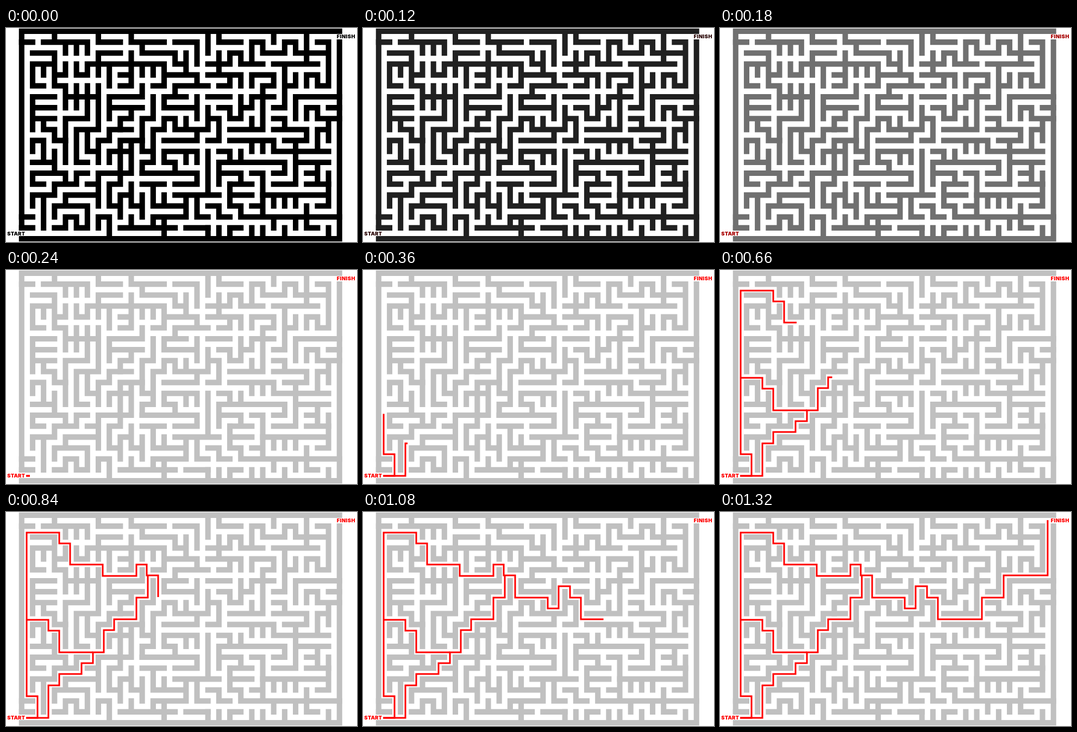
These frames come from a looping animation (646x395 px, 1350 ms). An HTML page:

```html
<!DOCTYPE html>
<html lang="en">
<head>
<meta charset="utf-8">
<title>Maze solver</title>
<style>
  html, body { margin: 0; width: 100%; height: 100%; overflow: hidden; background: #fff; }
  svg { display: block; width: 646px; height: 395px; }
  .walls, .route, text { animation: 1350ms infinite step-end; }
  .walls { fill: none; stroke-width: .5; stroke-linecap: square; animation-name: fade; }
  text { font: 900 9.4px Inter, "Liberation Sans", sans-serif; letter-spacing: .2px; animation-name: redden; }
  .finish { letter-spacing: .5px; }
  .route { fill: none; stroke: #f00; stroke-width: 3; stroke-dasharray: 2000; stroke-dashoffset: 2010; }
  .upper { animation-name: upper; }
  .lower { animation-name: lower; }
  .link { animation-name: link; }

  @keyframes fade {
    0% { stroke: #000; }
    8.889% { stroke: #202020; }
    13.333% { stroke: #707070; }
    17.778%, 100% { stroke: #c0c0c0; }
  }
  @keyframes redden {
    0% { fill: #000; }
    8.889% { fill: #2a0606; }
    13.333% { fill: #a80000; }
    17.778%, 100% { fill: #f00; }
  }
  /* Dash offset is 2000 minus the length drawn; one step per 60 ms. */
  @keyframes upper {
    0% { stroke-dashoffset: 2010; }
    17.778% { stroke-dashoffset: 1993; animation-timing-function: steps(4); }
    35.556% { stroke-dashoffset: 1696; animation-timing-function: steps(6); }
    62.222% { stroke-dashoffset: 1214; animation-timing-function: steps(5); }
    84.444% { stroke-dashoffset: 857; animation-timing-function: steps(3); }
    97.778%, 100% { stroke-dashoffset: 580; }
  }
  @keyframes lower {
    0% { stroke-dashoffset: 2010; }
    17.778% { stroke-dashoffset: 1993; animation-timing-function: steps(4); }
    35.556% { stroke-dashoffset: 1797; animation-timing-function: steps(6); }
    62.222%, 100% { stroke-dashoffset: 1500; }
  }
  @keyframes link {
    0% { stroke-dashoffset: 2010; }
    31.111% { stroke-dashoffset: 1995; }
    35.556% { stroke-dashoffset: 1918; animation-timing-function: steps(2); }
    44.444%, 100% { stroke-dashoffset: 1780; }
  }
</style>
</head>
<body>
<svg viewBox="0 0 646 395">
  <!-- One unit is one maze cell. -->
  <g class="walls" transform="translate(28.8 6) scale(20.17 20.16)">
    <path d="M0 18V0H29M29 1V19H0"/>
    <!-- left, top to bottom -->
    <path d="M0 1H1M2 1H6V2M3 0V1M4 1V2M5 1V2M1 2H3V4H4V3M2 5H1V3H3M2 3V4M3 4V5H4V7M4 8V12
      M5 3V4H6V3H10M7 2V4M7 0V1H9M7 2H9M8 3V5M10 2V5H9M9 4H10M5 5V7M6 5V8H4M4 6H7M7 5V9H5V12H6M6 9V11H7"/>
    <path d="M3 6H1V9M1 7H3M1 8H3M2 8V9H3V10H4M1 11V10H2V12M1 12H3V11M3 12V13M7 12V10H8V9H10
      M2 14H1V13H4V14M6 13H5V14H3V15H1V16M2 15V18M0 17H1M0 18H1M4 16V15H7M6 14H7M7 13V16
      M3 17V16H6V18H5V17H4V18H3M7 18V17H8V19"/>
    <!-- centre left -->
    <path d="M10 0V1H13M14 1H16V3M16 4V5M11 1V2H14V3H15M15 2V4M10 3H13V5H12M11 3V4M12 3V4M13 4H16M14 6V5H17
      M11 5V6H8V8M8 7H11M10 7V8H9V9M12 6V8H11V11H12M12 9V12H11V13M15 6H13V7H16M16 6V8
      M12 9H13V8H14V9H17V7M15 8V9M16 9V10H13M17 10H18V8H17"/>
    <path d="M9 11V10H11M10 10V13M8 12V11H10M9 11V14M7 13H10M11 13H16V14H14M8 16V14H9M11 14H13M12 14V16H15
      M10 14V16H11M9 15H10M9 15V17M8 16H9M11 17V15M10 17V18M9 18H14M12 17V18M13 19V17M12 17H15V15M13 15V16M14 15H18
      M16 12V11H13V12H14V13M15 11V12M17 11V15M16 15V17H17M15 18H17"/>
    <!-- top right -->
    <path d="M17 0V2M18 0V1H20M17 3H19V2H20V3H22M18 2V4M21 1V3M21 1H22V2H24V1H25V2H26M23 0V1M26 0V3
      M23 3H27M26 2H28M27 1H28V5H27V4H26V5M24 3V7H23M24 5H25V4M17 4H20V5M20 6V8H19V7H18M18 5H19V4M17 6H19
      M21 5V4H23V5H22V9H19M20 7H21V6H23M21 8V9"/>
    <!-- right -->
    <path d="M29 6H25V8M26 8V7H27V8H29M28 8V10M28 7H29M23 8H24V9M23 9H26V10H24M28 9H27V11M25 11H28
      M19 10H23M25 10V14H23M23 13H24V12H18V14M21 10V11M22 10V11M23 10V11H25M18 11H19V12M20 11V12
      M18 13H20V14M21 13H22V15M19 14H21M25 12H28M27 12V14M26 14H28M26 13H27"/>
    <!-- bottom right -->
    <path d="M28 13V15H22V17M19 14V16H20V17H29M19 15H21M17 16H18V17H19M21 16H22
      M23 15V16M24 15V16M25 15V16M26 16V17M28 15V16H27M23 17V18M25 17V18M26 17V18
      M17 18V19M18 18V19M20 18H19V19M21 18V19M22 18V19M24 18V19M27 18H26M28 18V19"/>
  </g>
  <path class="route lower" d="M37 380H78V320H98V299H139V279H160V259H180V218H199V198H240V158H261V118"/>
  <path class="route link" d="M37 199H78V219H98V259H160"/>
  <path class="route upper" d="M37 380H58V340H38V38H98V58H118V97H178V118H240V97H259V117H280V158H340V178H360V137H381V158H401V198H482V158H522V117H603V15"/>
  <text x="2.3" y="383.4">START</text>
  <text class="finish" x="608.7" y="19">FINISH</text>
</svg>
</body>
</html>
```
